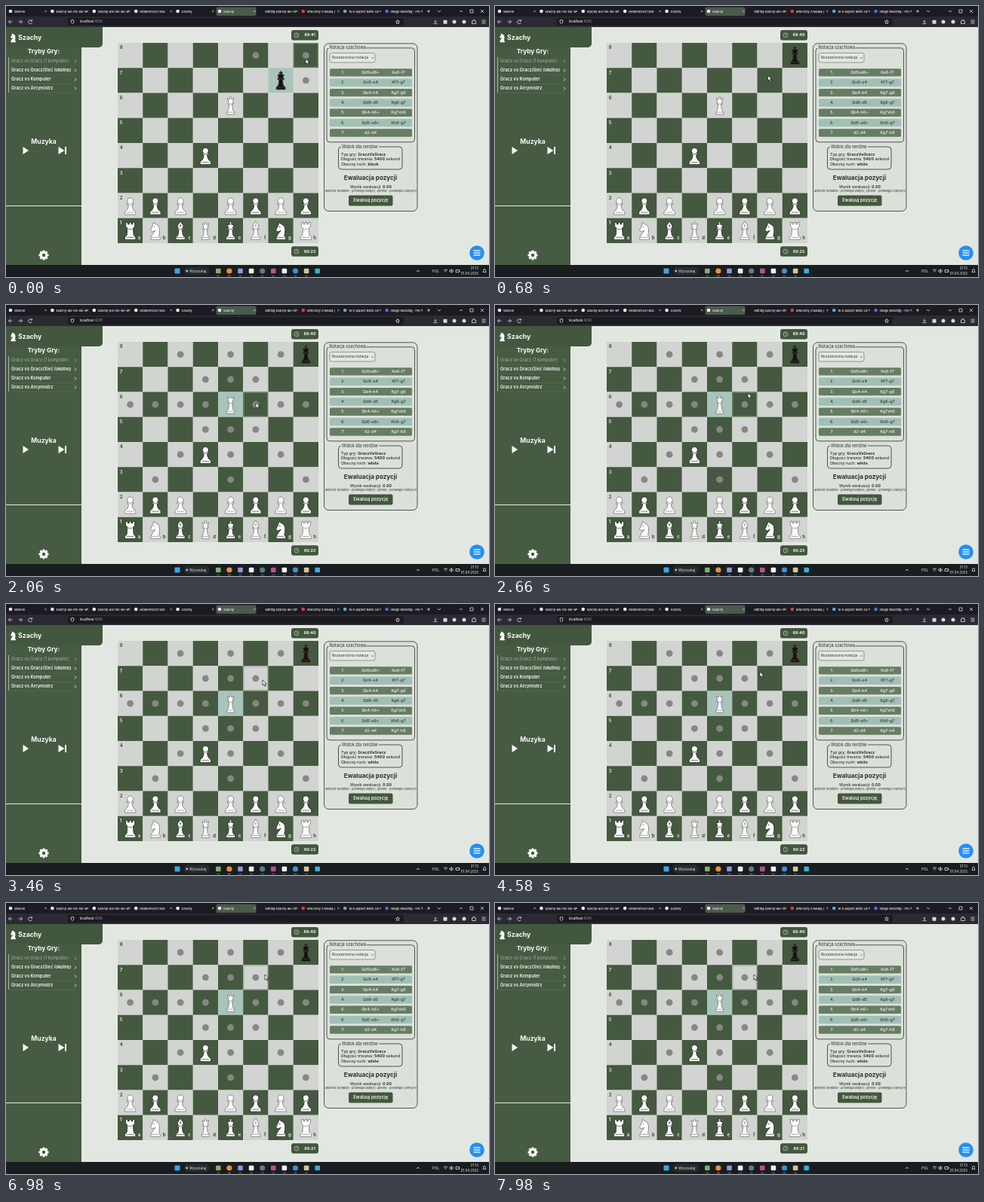
An HTML page with a canvas that plays this animation: 640 by 360 pixels, repeating every 8000 ms.

```html
<!DOCTYPE html>
<html lang="pl">
<head>
<meta charset="utf-8">
<title>Szachy</title>
<style>
html, body { margin: 0; width: 100%; height: 100%; overflow: hidden; background: #e3e7e1; }
canvas { display: block; width: 640px; height: 360px; }
</style>
</head>
<body>
<canvas id="stage"></canvas>
<script>
const LOOP = 8000;
const KING_MOVES = 420, QUEEN_PICKED = 1560, SECOND = 2500;
const GREEN = '#455940', LIGHT = '#d2d4d1', PAGE = '#e3e7e1', TEAL = '#a1bfb5', INK = '#2b3031';
const BOARD = { x: 148, y: 49, cell: 33.25 };

const canvas = document.getElementById('stage');
const scale = window.devicePixelRatio || 1;
canvas.width = 640 * scale;
canvas.height = 360 * scale;
const ctx = canvas.getContext('2d');

// ---------- drawing helpers ----------
function box(x, y, w, h, fill, radius = 0, stroke, lineWidth = 1) {
  ctx.beginPath();
  ctx.roundRect(x, y, w, h, radius);
  if (fill) { ctx.fillStyle = fill; ctx.fill(); }
  if (stroke) { ctx.strokeStyle = stroke; ctx.lineWidth = lineWidth; ctx.stroke(); }
}

function disc(x, y, r, fill) {
  ctx.beginPath();
  ctx.arc(x, y, r, 0, Math.PI * 2);
  ctx.fillStyle = fill;
  ctx.fill();
}

function path(d, x, y, fill, stroke, lineWidth = 1, size = 1) {
  const shape = new Path2D(d);
  ctx.save();
  ctx.translate(x, y);
  ctx.scale(size, size);
  if (fill) { ctx.fillStyle = fill; ctx.fill(shape); }
  if (stroke) { ctx.strokeStyle = stroke; ctx.lineWidth = lineWidth; ctx.lineJoin = 'round'; ctx.stroke(shape); }
  ctx.restore();
}

function text(str, x, y, size, { color = INK, weight = 400, align = 'left', italic = false } = {}) {
  ctx.font = `${italic ? 'italic ' : ''}${weight} ${size}px Inter, sans-serif`;
  ctx.textAlign = align;
  ctx.textBaseline = 'middle';
  ctx.fillStyle = color;
  ctx.fillText(str, x, y);
  return ctx.measureText(str).width;
}

function labelled(label, value, x, y, size, tail = '') {
  x += text(label, x, y, size, { weight: 500 });
  x += text(value, x, y, size, { weight: 700 });
  text(tail, x, y, size, { weight: 500 });
}

function fieldset(x, y, w, h, legend, legendX, legendWidth) {
  box(x, y, w, h, null, 4, INK, .8);
  box(legendX - 1, y - 3, legendWidth, 6, '#dbe1d9');
  text(legend, legendX, y, 5.6);
}

// ---------- chess pieces ----------
const PIECES = {
  P: 'M-7.2,12V9Q-6.8,6.8 -4.5,6Q-2.2,3 -2.2,-1H-4.2V-3H-2.4A4,4 0 1 1 2.4,-3H4.2V-1H2.2Q2.2,3 4.5,6Q6.8,6.8 7.2,9V12Z',
  R: 'M-7.2,12V9L-4.5,6L-3.8,-3.5L-6,-5.5V-11H-3.3V-8.5H-1.4V-11H1.4V-8.5H3.3V-11H6V-5.5L3.8,-3.5L4.5,6L7.2,9V12Z',
  B: 'M-6,12V9L-3.2,6L-2.2,-1H-4V-2.8H-2.4Q-6,-6 -1,-10.5A1.1,1.1 0 1 1 1,-10.5Q6,-6 2.4,-2.8H4V-1H2.2L3.2,6L6,9V12Z',
  Q: 'M-5,12V9L-2.8,6L-2,-2H-3.6V-3.8H-2.6L-4.4,-9.5L-1.4,-8L-.8,-10A1.1,1.1 0 1 1 .8,-10L1.4,-8L4.4,-9.5L2.6,-3.8H3.6V-2H2L2.8,6L5,9V12Z',
  K: 'M-6,12V9L-3.2,6L-2.3,-1H-4.2V-3H-2.8L-4.2,-7.5L-.8,-8.5V-9.5H-2.2V-10.8H-.8V-12H.8V-10.8H2.2V-9.5H.8V-8.5L4.2,-7.5L2.8,-3H4.2V-1H2.3L3.2,6L6,9V12Z',
  N: 'M-6,12V9Q-4.5,5 0,0L-4,1.5L-6.5,-.5L-3.2,-7.5L-2.4,-11L0,-9Q7,-7 5.5,3L4.7,7L6.5,9V12Z'
};

const square = name => ({ col: name.charCodeAt(0) - 97, row: 8 - name[1] });
const squareName = (col, row) => String.fromCharCode(97 + col) + (8 - row);
const corner = ({ col, row }) => [BOARD.x + col * BOARD.cell, BOARD.y + row * BOARD.cell];
const center = sq => corner(sq).map(v => v + BOARD.cell / 2);

const whitePieces = { d4: 'P', e6: 'Q' };
[...'abcefgh'].forEach(file => whitePieces[file + 2] = 'P');
[...'RNBQKBNR'].forEach((kind, i) => whitePieces[squareName(i, 7)] = kind);

function queenMoves(from) {
  const moves = [], start = square(from);
  for (const dc of [-1, 0, 1]) for (const dr of [-1, 0, 1]) {
    if (!dc && !dr) continue;
    for (let col = start.col + dc, row = start.row + dr;
         col >= 0 && col < 8 && row >= 0 && row < 8 && !whitePieces[squareName(col, row)];
         col += dc, row += dr) moves.push(squareName(col, row));
  }
  return moves;
}
const QUEEN_TARGETS = queenMoves('e6');
const KING_TARGETS = ['f8', 'h8', 'h7'];

function drawPiece(kind, name, black) {
  const sq = square(name), [x, y] = center(sq);
  const onLight = (sq.col + sq.row) % 2 === 0;
  const line = black ? '#5a4a38' : onLight ? '#757874' : '#20241f';
  path(PIECES[kind], x, y, black ? '#141414' : '#fbfbfb', line, .8);
  path('M-4.8,9H4.8', x, y, null, line, .6);
  if (kind === 'N') disc(x - 1.5, y - 5, .7, line);
  else path('M-2.6,-2H2.6', x, y, null, line, .6);
  if (kind === 'B') path('M0,-8.5V-4.5M-1.5,-6.5H1.5', x, y, null, line, .6);
}

// ---------- motion ----------
const POINTER = [
  [0, 397, 70], [420, 397, 70], [1050, 302, 130], [1600, 302, 130], [2000, 331, 130],
  [2450, 331, 130], [2900, 340, 101], [3600, 340, 101], [4300, 351, 90], [4900, 351, 90],
  [5500, 343, 95], [LOOP, 343, 95]
];

function pointerAt(t) {
  const i = POINTER.findIndex(key => key[0] > t);
  const [t0, x0, y0] = POINTER[i - 1], [t1, x1, y1] = POINTER[i];
  const u = (t - t0) / (t1 - t0), e = u * u * (3 - 2 * u);
  return [x0 + (x1 - x0) * e, y0 + (y1 - y0) * e];
}

function squareUnder([x, y]) {
  return squareName(Math.floor((x - BOARD.x) / BOARD.cell), Math.floor((y - BOARD.y) / BOARD.cell));
}

// ---------- page sections ----------
function drawBrowser() {
  box(0, 0, 640, 14, '#1c1b22');
  box(0, 14, 640, 14, '#2b2a33');
  box(278.5, 1.5, 53, 11.5, '#4b5a4d', 2);
  const tabs = [
    ['Wexolo', '#e8e8e8'], ['szachy-ale-nie-sie-w', '#f0f0f0'], ['szachy-ale-nie-sie-w', '#f0f0f0'],
    ['HiddenFox27/sza', '#f0f0f0'], ['Szachy', '#f0f0f0'], ['Szachy', '#f0f0f0'],
    ['Editing szachy-ale-ni', null], ['Wieczory z Nauką (', '#d8413a'],
    ['16:9 Aspect Ratio Ca', '#57a9dc'], ['Image Resizing - Fre', '#4a74d8']
  ];
  tabs.forEach(([title, color], i) => {
    const x = 6 + i * 55.4;
    if (color) disc(x, 7, 2.3, color);
    text(title, x + 5, 7.3, 4, { color: '#f3f3f5', weight: 500 });
    path('M-1.2,-1.2L1.2,1.2M1.2,-1.2L-1.2,1.2', x + 46.5, 7, null, '#d5d5da', .6);
  });
  const icon = (d, x, y) => path(d, x, y, null, '#dcdce0', .8);
  icon('M-2,0H2M0,-2V2', 560, 7);
  icon('M-2,-1L0,1L2,-1', 574, 7);
  icon('M-2,0H2', 603, 7);
  icon('M-2,-2H2V2H-2Z', 617, 7);
  icon('M-2,-2L2,2M2,-2L-2,2', 631, 7);
  icon('M2.5,0H-2.5L0,-2.5M-2.5,0L0,2.5', 6, 21);
  icon('M-2.5,0H2.5L0,-2.5M2.5,0L0,2.5', 19, 21);
  icon('M2,-1.5A2.5,2.5 0 1 0 2.5,1M2.5,-3V-1H.5', 32, 21);
  box(82, 16, 445, 10, '#1c1b22', 2);
  icon('M-2,-2L0,-2.6L2,-2Q2,2 0,2.7Q-2,2 -2,-2Z', 88, 21);
  const host = text('localhost', 98, 21.2, 4.2, { color: '#fbfbfe', weight: 500 });
  text(':4200', 98 + host, 21.2, 4.2, { color: '#a5a5ad' });
  icon('M0,-2.5L.8,-.8L2.5,-.7L1.2,.6L1.6,2.4L0,1.5L-1.6,2.4L-1.2,.6L-2.5,-.7L-.8,-.8Z', 519, 21);
  icon('M0,-2.5V1M-1.5,-.5L0,1L1.5,-.5M-2.5,2.5H2.5', 569, 21);
  box(579.5, 18.7, 5, 5, '#d8d8dc', .7);
  disc(594, 21, 2.5, '#d7dadd');
  disc(607, 21, 2.5, '#d7dadd');
  icon('M-2.5,-1H-1V-2.5H1V-1H2.5V2.5H-2.5Z', 620, 21);
  icon('M-2.5,-2H2.5M-2.5,0H2.5M-2.5,2H2.5', 633, 21);
}

function drawSidebar() {
  box(0, 28, 100, 316, '#475b43');
  box(0, 28, 128, 27, '#43573e', [0, 0, 5, 0]);
  const white = '#fafafa';
  path(PIECES.N, 9.5, 42, white, null, 1, .52);
  text('Szachy', 16, 42.3, 8.7, { color: white, weight: 700 });
  text('Tryby Gry:', 50, 60.5, 8.2, { color: white, weight: 700, align: 'center' });
  box(3, 68, .8, 47, '#c5cdc2');
  const modes = [['Gracz vs Gracz ', '(1 komputer)'], ['Gracz vs Gracz', '(Sieć lokalna)'],
    ['Gracz vs Komputer', ''], ['Gracz vs Arcymistrz', '']];
  modes.forEach(([title, note], i) => {
    const y = 73.6 + i * 11.95, color = i ? white : '#a8b2a5', weight = i ? 600 : 400;
    const w = text(title, 7, y, 5.7, { color, weight });
    text(note, 7 + w, y, 5.7, { color, weight, italic: true });
    path('M-1,-2L1,0L-1,2', 92, y, null, color, .8);
    box(7, y + 5.6, 86, .4, '#5e7059');
  });
  text('Muzyka', 50, 180.5, 8.6, { color: white, weight: 700, align: 'center' });
  path('M-3.5,-5L4,0L-3.5,5Z', 26, 192, white);
  path('M-5.5,-5L2.5,0L-5.5,5ZM3,-5H5V5H3Z', 75, 192, white);
  box(0, 265, 100, 1, '#e8ece6');
  for (let i = 0; i < 8; i++) {
    ctx.save();
    ctx.translate(50, 331);
    ctx.rotate(i * Math.PI / 4);
    box(-1.5, -6.5, 3, 4, white, .7);
    ctx.restore();
  }
  disc(50, 331, 5, white);
  disc(50, 331, 2.2, '#475b43');
}

function drawClock(y, time) {
  box(378, y, 36, 13.5, '#43573e', 3);
  ctx.beginPath();
  ctx.arc(385, y + 6.8, 2.9, 0, Math.PI * 2);
  ctx.strokeStyle = '#dfe5dc';
  ctx.lineWidth = .6;
  ctx.stroke();
  path('M0,-1.8V0L1.4,.8', 385, y + 6.8, null, '#dfe5dc', .5);
  text(time, 402.5, y + 6.8, 5.4, { color: '#f4f6f3', weight: 700, align: 'center' });
}

function drawBoard(t, pointer) {
  const kingSquare = t < KING_MOVES ? 'g7' : 'h8';
  const selected = t < KING_MOVES ? 'g7' : t >= QUEEN_PICKED ? 'e6' : null;
  const targets = selected === 'g7' ? KING_TARGETS : selected ? QUEEN_TARGETS : [];
  const hovered = squareUnder(pointer);

  for (let row = 0; row < 8; row++) for (let col = 0; col < 8; col++) {
    const [x, y] = corner({ col, row }), name = squareName(col, row), s = BOARD.cell;
    const light = (col + row) % 2 === 0;
    box(x, y, s, s, name === selected ? '#a9c4bb' : light ? LIGHT : GREEN);
    if (name === hovered && targets.includes(name))
      box(x + .7, y + .7, s - 1.4, s - 1.4, null, 0, light ? '#a3ada1' : '#66805f', 1.4);
    const color = light ? '#3d4f39' : '#dbe0d8';
    if (!col) text(8 - row, x + 2.8, y + 6.5, 6, { color, weight: 700 });
    if (row === 7) text(name[0], x + s - 3, y + s - 6.5, 6, { color, weight: 700, align: 'right' });
  }
  for (const name of targets) disc(...center(square(name)), 4.4, '#858884');
  for (const name in whitePieces) drawPiece(whitePieces[name], name);
  drawPiece('K', kingSquare, true);
}

function drawPanel(t) {
  const moved = t >= KING_MOVES;
  box(421.5, 49.8, 123.5, 222.7, '#dbe1d9', 6, INK, .8);
  fieldset(425, 55.8, 116.5, 125, 'Notacja szachowa', 428.5, 50);
  box(429, 62.5, 60, 12.5, '#e4e8e2', 2.5, '#5c615c', .6);
  text('Rozszerzona notacja', 432, 69, 4.9);
  path('M-1.2,-.6L0,.7L1.2,-.6', 485.5, 69, null, INK, .7);
  const moves = ['Qd5xd8+ Ke8-f7', 'Qc6-e4 Kf7-g7', 'Qe4-h4 Kg7-g6', 'Qd8-d5 Kg6-g7',
    'Qh4-h6+ Kg7xh6', 'Qd5-e6+ Kh6-g7', moved ? 'd2-d4 Kg7-h8' : 'd2-d4'];
  moves.forEach((line, i) => {
    const y = 88.4 + i * 13.35, odd = i % 2 === 0;
    const style = { color: odd ? '#f2f5f1' : '#2d3b34', weight: 500, align: 'center' };
    box(429, y - 5.2, 109, 10.4, odd ? '#667d64' : TEAL, 1.5);
    const [white, black = ''] = line.split(' ');
    text(i + 1 + '.', 446.5, y, 5.4, style);
    text(white, 483, y, 5.4, style);
    text(black, 520, y, 5.4, style);
  });
  fieldset(440.5, 187, 84.5, 30, 'Widok dla nerdów', 445, 50);
  labelled('Typ gry: ', 'GraczVsGracz', 444, 197, 5.3);
  labelled('Długość trwania: ', '5400', 444, 203.6, 5.3, ' sekund');
  labelled('Obecny ruch: ', moved ? 'white' : 'black', 444, 210.2, 5.3);
  text('Ewaluacja pozycji', 483, 228.5, 8.1, { weight: 700, align: 'center' });
  labelled('Wynik ewaluacji: ', '0.00', 456, 240, 5.2);
  text('(wartość dodatnia - przewaga białych, ujemna - przewaga czarnych)', 483.3, 245.6, 3.7, { italic: true, align: 'center' });
  box(454, 251.5, 58.5, 14, '#43573e', 2);
  text('Ewaluuj pozycję', 483.2, 258.7, 5.9, { color: '#f5f7f4', weight: 600, align: 'center' });
}

function drawTaskbar() {
  box(0, 344, 640, 16, '#191d1f');
  box(223.5, 348.5, 7, 7, '#3aa6e8', 1);
  box(236, 346.5, 34, 11, '#262b2e', 5);
  disc(239.7, 352, 1.4, '#b9c0c5');
  text('Wyszukaj', 243, 352.2, 4.9, { color: '#dfe3e6' });
  const apps = ['#7fb069', '#f08c3a', '#8d96dd', '#eeeeee', '#5b7f86', '#b6528e', '#f2f2f2', '#3f8fd2', '#d3c59a', '#35b1d8'];
  apps.forEach((color, i) => {
    const x = 281.3 + i * 14.6;
    if (i % 3 === 1) disc(x, 352, 3.6, color);
    else box(x - 3.3, 348.7, 6.6, 6.6, color, 1.2);
    if (i < 9) box(x - 2, 358, 4, .8, i === 1 ? '#65bfee' : '#85898c', .4);
  });
  const icon = (d, x) => path(d, x, 352, null, '#e5e8ea', .8);
  icon('M-2,1L0,-1L2,1', 546);
  text('POL', 569.5, 352.2, 4.6, { color: '#f0f2f3', align: 'center' });
  icon('M-2.5,-1Q0,-3 2.5,-1M-1.2,.7Q0,-.4 1.2,.7M0,2V2.3', 582.5);
  icon('M-2,-1H-1L.5,-2.3V2.3L-1,1H-2ZM1.8,-1.5Q3,0 1.8,1.5', 590);
  icon('M-2.5,-1.5H2V1.5H-2.5ZM2.8,-.5V.5', 598.5);
  text('21:13', 626, 349, 4.4, { color: '#f0f2f3', align: 'right' });
  text('01.04.2025', 626, 355.3, 4.4, { color: '#f0f2f3', align: 'right' });
  icon('M-2,1.5Q-1.5,1 -1.5,-.5Q-1.5,-2.5 0,-2.5Q1.5,-2.5 1.5,-.5Q1.5,1 2,1.5Z', 634);
}

function drawChatButton() {
  disc(624, 328, 9.8, '#2490f0');
  path('M-4.5,-3H4.5M-4.5,0H4.5M-4.5,3H4.5', 624, 328, null, '#d9edff', 1.3);
}

function drawPointer(t, pointer) {
  const grabbing = t >= KING_MOVES && t < QUEEN_PICKED && whitePieces[squareUnder(pointer)];
  const shape = grabbing
    ? 'M0,0Q1,-1 1.6,0V2.6L4.4,3.3Q5,3.6 4.7,5L4,7.5H.6L-1.6,4.6Q-1.4,3.6 0,4.4Z'
    : 'M0,0V7L1.7,5.5L2.9,8.2L4.2,7.6L3,5H5.2Z';
  path(shape, ...pointer, '#ffffff', '#111111', .7);
}

function draw(t) {
  ctx.setTransform(scale, 0, 0, scale, 0, 0);
  box(0, 0, 640, 360, PAGE);
  const pointer = pointerAt(t);
  drawBrowser();
  drawSidebar();
  drawClock(32, t < KING_MOVES ? '89:41' : '89:40');
  drawBoard(t, pointer);
  const elapsed = Math.max(0, Math.floor((t - KING_MOVES) / SECOND));
  drawClock(319.3, '89:' + (23 - Math.min(2, elapsed)));
  drawPanel(t);
  drawChatButton();
  drawTaskbar();
  drawPointer(t, pointer);
}

const start = performance.now();
function tick() {
  draw((performance.now() - start) % LOOP);
  requestAnimationFrame(tick);
}
tick();
</script>
</body>
</html>
```
